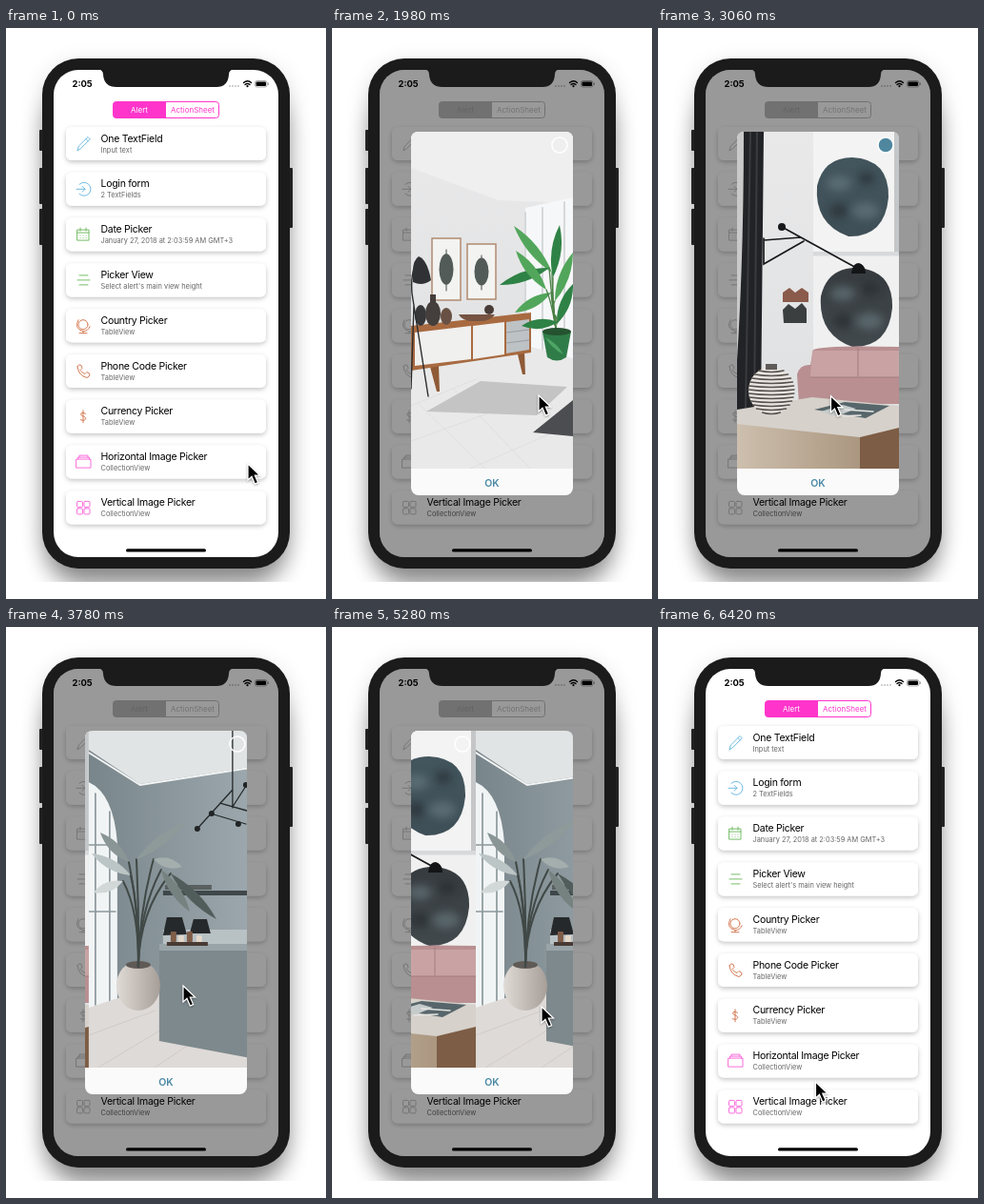
An HTML page for the animation above (7020 ms loop, 336x600 px).

```html
<!DOCTYPE html>
<html lang="en">
<head>
<meta charset="utf-8">
<title>Image picker</title>
<style>
html, body { margin: 0; width: 100%; height: 100%; overflow: hidden; background: #fff }
svg { display: block; font-family: Inter, "Liberation Sans", sans-serif }
.icon { fill: none; stroke: currentColor; stroke-width: .9; stroke-linecap: round; stroke-linejoin: round }
.tint { color: var(--tint) }
.on { fill: #fff }
.dimmed .tint { color: #bcbcbc }
.dimmed .on { fill: #a4a4a4 }
.title { font-size: 10.5px; letter-spacing: -.27px }
.note { font-size: 7.4px; fill: #666 }
</style>
</head>
<body>
<svg id="stage" width="336" height="600" viewBox="0 0 336 600"></svg>
<script>
const LOOP = 7020, STEP = 60, PAGE = 170;
const BLUE = '#5fb4dd', GREEN = '#67b657', ORANGE = '#d06c42', PINK = '#fb5fd8';

const rect = (x, y, w, h, fill, r = 0, more = '') =>
  `<rect x="${x}" y="${y}" width="${w}" height="${h}" rx="${r}" fill="${fill}" ${more}/>`;
const oval = (x, y, rx, ry, fill, more = '') =>
  `<ellipse cx="${x}" cy="${y}" rx="${rx}" ry="${ry}" fill="${fill}" ${more}/>`;
const shape = (d, fill) => `<path d="${d}" fill="${fill}"/>`;
const line = (d, stroke, w = 1) =>
  `<path d="${d}" fill="none" stroke="${stroke}" stroke-width="${w}" stroke-linecap="round"/>`;
const gradient = (id, a, b, across = 0) =>
  `<linearGradient id="${id}" x2="${across}" y2="${1 - across}"><stop stop-color="${a}"/><stop offset="1" stop-color="${b}"/></linearGradient>`;
const blur = (id, size) =>
  `<filter id="${id}" x="-30%" y="-20%" width="160%" height="140%"><feGaussianBlur stdDeviation="${size}"/></filter>`;

// A pointed leaf between two points, bulging by w on both sides.
function leaf(x1, y1, x2, y2, w, fill) {
  const len = Math.hypot(x2 - x1, y2 - y1);
  const nx = (y1 - y2) / len * w, ny = (x2 - x1) / len * w;
  const mx = (x1 + x2) / 2, my = (y1 + y2) / 2;
  return shape(`M${x1} ${y1}Q${mx + nx} ${my + ny} ${x2} ${y2}Q${mx - nx} ${my - ny} ${x1} ${y1}`, fill);
}

// ---- list behind the alert ----
const rows = [
  ['One TextField', 'Input text', BLUE, 'M-6 7l1.4-4.4L5-7l2.3 2.3L-2.3 5zM3-5l2.3 2.3'],
  ['Login form', '2 TextFields', BLUE, 'M-4-5A7 7 0 1 1-4 5M-7 0H2M-1-3L2 0-1 3'],
  ['Date Picker', 'January 27, 2018 at 2:03:59 AM GMT+3', GREEN,
    'M-6-5H6V6H-6zM-6-2H6M-3-7v3M3-7v3M-3 1h.1M0 1h.1M3 1h.1M-3 3.5h.1M0 3.5h.1M3 3.5h.1'],
  ['Picker View', "Select alert's main view height", GREEN, 'M-4-5H5M-6 0H7M-4 5H5'],
  ['Country Picker', 'TableView', ORANGE, 'M5-1A5 5 0 1 1-5-1A5 5 0 1 1 5-1M-5-6Q-10 3 0 6Q5 6 7 1M0 6v2M-4 8H4'],
  ['Phone Code Picker', 'TableView', ORANGE, 'M-6-5Q-4-8-2-6L-1-3L-3-1Q-1 2 2 3L4 1L7 3Q7 6 4 7Q-5 5-6-5'],
  ['Currency Picker', 'TableView', ORANGE, 'M2.5-3Q0-5-2-3.5C-4 0 3-1 2.7 2.5Q1 5-2.7 3.4M0-6.5V6.5'],
  ['Horizontal Image Picker', 'CollectionView', PINK, 'M-7-3H8V6H-7zM-5.5-3v-2H6.5v2M-4-5v-2H5v2'],
  ['Vertical Image Picker', 'CollectionView', PINK,
    [[-6.5, -6.5], [1, -6.5], [-6.5, 1], [1, 1]].map(([x, y]) => `M${x + 1} ${y}h4q1 0 1 1v4q0 1-1 1h-4q-1 0-1-1v-4q0-1 1-1`).join('')]
];
const cards = rows.map(([title, note, tint, icon], i) => `<g transform="translate(63 ${104 + i * 47.8})">
  ${rect(0, 0, 210, 35, '#fff', 6, 'filter="url(#cardShadow)"')}
  <path class="icon tint" style="--tint:${tint}" transform="translate(18 17.5)" d="${icon}"/>
  <text class="title" x="36.5" y="15.5">${title}</text><text class="note" x="36.5" y="26.5">${note}</text></g>`).join('');

const segments = `<g class="tint" style="--tint:#ff35cb" font-size="8" text-anchor="middle">
  ${rect(112.5, 77.5, 111, 17, 'none', 3, 'stroke="currentColor"')}
  ${shape('M168 77.5H115.5q-3 0-3 3v11q0 3 3 3H168z', 'currentColor')}
  <text class="on" x="140" y="89">Alert</text><text x="196" y="89" fill="currentColor">ActionSheet</text></g>`;

const status = `<text x="69.5" y="62" font-size="9.4" font-weight="700">2:05</text>
  ${[235, 238, 241, 244].map(x => oval(x, 61, .9, .9, '#bbb')).join('')}
  ${line('M249.5 57.5Q253.5 54 257.5 57.5M251 59.5Q253.5 57.5 256 59.5', '#000', 1.3)}${oval(253.5, 61.2, 1.1, 1.1, '#000')}
  ${rect(261.5, 55.5, 12.5, 6.5, 'none', 2, 'stroke="#888" stroke-width=".7"')}${rect(262.5, 56.5, 10.5, 4.5, '#000', 1)}${rect(274.7, 57.5, 1, 2.5, '#888')}`;

// ---- room pictures, each 170 x 354 ----
function tiles() {
  let d = '';
  const depth = r => 1 + r * .073, y = z => 134 + 220 / z;
  for (let r = 0; r < 26; r++) for (let c = -7; c < 7; c++) {
    if ((r + c) & 1) continue;
    const a = depth(r), b = depth(r + 1), x = (n, z) => 85 + n * 40 / z;
    d += `M${x(c, a)} ${y(a)}H${x(c + 1, a)}L${x(c + 1, b)} ${y(b)}H${x(c, b)}z`;
  }
  return shape(d, '#1d1e20');
}

const lounge = () => rect(0, 0, 86, 210, 'url(#wallGrey)') + rect(86, 0, 84, 210, 'url(#wallBlue)')
  + rect(0, 133, 170, 2, '#3b4a54')
  + `<path d="M36 196V90A50 51 0 0 1 136 90V196z" fill="url(#mirror)" stroke="#93a6b0"/>`
  + shape('M36 157Q50 150 63 164L66 190H36z', '#45312e') + shape('M72 168H100Q122 166 131 154Q135 170 108 174L94 176V192H86V174H72z', '#202226')
  + line('M82 166L76 145M83 165L84 142M84 165L91 147', '#25211f') + oval(76, 148, 5, 4, '#5e3a31') + oval(86, 148, 5, 4, '#784538')
  + rect(0, 196, 170, 14, '#34373b') + rect(0, 209, 170, 145, '#d9d6d3') + tiles()
  + line('M4 220L1 265M40 220L44 266M138 222L136 266M166 228L168 268', '#1b1b1c', 1.5)
  + shape('M0 154Q28 149 40 166Q51 182 47 214Q24 229 0 224z', '#7e4631') + shape('M0 192Q28 186 47 204Q44 225 0 224z', '#572f23')
  + shape('M170 155Q147 155 138 176L131 200Q131 218 140 227Q156 231 170 230z', '#573a34') + shape('M170 195Q148 191 135 206Q138 226 170 230z', '#3c2826')
  + shape('M54 241L60 269H64L65 245zM111 245L115 269H119L121 238zM81 246V272H85V246z', '#77777a')
  + shape('M48 231L66 221H109L122 231L116 242L89 247L56 243z', '#b4b4b2') + shape('M48 231L56 240L89 244L116 239L122 231L116 243L89 249L56 245z', '#858687')
  + shape('M64 228L74 207H81L84 228zM90 226L94 208H98L105 226Z', '#8e9796') + oval(77, 199, 6, 6, '#b49a8d') + oval(82, 190, 4, 4, '#d5cbc3');

const frame = (x, y, w, h) => rect(x, y, w, h, '#f3f3f1', 0, 'stroke="#b08b70" stroke-width="1.5"')
  + line(`M${x + w / 2} ${y + 12}v${h - 22}`, '#454b4a') + oval(x + w / 2, y + h / 2, w * .25, h * .25, '#535b59');

const palm = () => [[148, 148, 108, 99], [145, 143, 93, 161], [147, 169, 109, 190], [149, 153, 156, 98],
    [151, 178, 170, 127], [153, 202, 170, 160], [142, 166, 110, 125], [154, 200, 116, 204]]
  .map(([a, b, c, d], i) => line(`M153 214Q148 180 ${a} ${b}`, '#4c8047', 1.3) + leaf(a, b, c, d, 10, i & 1 ? '#2f8246' : '#52a65b')).join('');

const studio = () => rect(0, 0, 170, 354, 'url(#whiteWall)') + shape('M0 0H170V75L92 72L0 38z', '#efeff0')
  + shape('M120 80L170 69V245H120z', '#f6f7f8') + line('M120 85V234M138 80V236M161 74V225', '#d5d8da', 2)
  + frame(22, 112, 30, 65) + frame(59, 118, 30, 58)
  + shape('M0 252L126 226L170 238V354H0z', '#e9e9e9') + line('M0 288L68 260M0 325L125 280M62 354L170 307M45 270L125 354M8 286L78 354', '#d8d8d8', .6)
  + shape('M16 294L73 262L164 268L132 298z', '#c4c4c4') + shape('M128 316L170 282V320z', '#4c4d50')
  + shape('M20 247L27 273H30L29 245zM112 234L117 255H120L119 230z', '#8f5a36')
  + shape('M0 204L126 190V232L0 251z', '#a86a40') + shape('M4 211L63 204V239L4 246zM65 204L98 200V234L65 239z', '#f0f0ef') + shape('M100 200L124 197V229L100 233z', '#bdc2c5') + line('M100 211L124 208M100 222L124 219', '#8a8f92', .7)
  + oval(10, 193, 6, 11, '#37373a') + oval(23, 191, 8, 13, '#443e3c') + rect(20, 171, 6, 9, '#443e3c') + oval(37, 194, 6, 9, '#685144')
  + shape('M50 192H88Q83 200 69 199Q54 200 50 192z', '#765342') + oval(82, 187, 5, 5, '#493c37')
  + line('M8 137Q-1 144 1 170L18 278M3 182L0 270', '#2b2c2e', 1.4) + shape('M2 158Q0 136 8 131Q17 134 21 156Q12 163 2 158z', '#303134')
  + palm() + shape('M138 210H168L163 237Q153 244 143 237z', '#2f7c49') + oval(153, 210, 15, 4, '#25522f') + leaf(141, 216, 160, 234, 4, '#4ea565');

const blob = (x, y, fill) => shape(`M${x - 37} ${y - 12}Q${x - 30} ${y - 42} ${x} ${y - 42}Q${x + 39} ${y - 40} ${x + 38} ${y}Q${x + 34} ${y + 42} ${x - 4} ${y + 41}Q${x - 40} ${y + 28} ${x - 37} ${y - 12}`, fill)
  + `<g filter="url(#soft)" opacity=".55">${oval(x - 14, y - 15, 13, 8, '#6d8087')}${oval(x + 14, y + 14, 14, 9, '#6d8087')}${oval(x + 15, y - 20, 9, 7, '#20262a')}${oval(x - 14, y + 14, 10, 8, '#20262a')}</g>`;

function stripes() {
  let s = oval(36, 272, 24, 25, '#e8e4df') + rect(30, 244, 12, 6, '#5f5b58');
  for (let y = -21; y < 24; y += 4) {
    const w = 24 * Math.sqrt(1 - y * y / 625);
    s += line(`M${36 - w} ${272 + y}Q36 ${275 + y} ${36 + w} ${272 + y}`, '#56514e', 1.5);
  }
  return s;
}

const gallery = () => rect(0, 0, 170, 354, 'url(#whiteWall)') + rect(80, 0, 85, 126, '#f3f3f3') + rect(80, 131, 90, 110, '#f0f0f0') + rect(80, 126, 90, 4, '#d8d9da') + rect(165, 0, 5, 126, '#c4c6c8')
  + blob(121, 69, 'url(#paintBlue)') + blob(125, 185, 'url(#paintGrey)')
  + rect(0, 0, 9, 293, '#c9c9ca') + shape('M7 0H28L25 293H0V240Q7 130 7 0z', '#222326') + line('M14 0L9 290M21 0L18 290', '#3a3b3e', 2)
  + line('M28 112V139L70 115M28 114L67 111M47 100L127 144', '#18191b', 1.7) + oval(47, 100, 4, 4, '#18191b') + shape('M120 149Q121 138 128 138Q135 140 135 149z', '#141517')
  + shape('M48 169L55 164L61 169L68 164L75 169V179H48z', '#8a5a4b') + shape('M48 187L54 181L61 186L68 180L73 186V201H49z', '#3c3f40')
  + shape('M63 255Q66 244 77 245L80 229Q91 224 170 226V286H65z', '#b98f91') + shape('M79 230H170V258H77z', '#c9a3a4') + line('M77 258H170M127 228V257', '#a37c80')
  + shape('M0 292L79 279L170 288V311L129 321L0 307z', '#d6d1cb') + shape('M0 307L129 321V354H0z', 'url(#wood)') + shape('M129 321L170 311V354H129z', '#7d5d45')
  + shape('M81 292L113 284L160 288L135 301z', '#57666b') + shape('M88 294L111 287L125 291L105 299z', '#c5cbcb') + line('M113 292L143 294M105 299L130 298', '#e5e5e2', 1.5) + stripes();

const fronds = () => [[44, 152, 3, 129, '#bcc5c5'], [42, 138, 12, 107, '#8a9595'], [36, 158, 5, 170, '#d2d8d8'], [50, 135, 103, 95, '#8e9a9a'],
    [68, 135, 98, 143, '#a4aead'], [86, 150, 134, 198, '#515d5b'], [76, 146, 106, 190, '#76827f']]
  .map(([a, b, c, d, fill]) => line(`M52 248Q53 190 ${a} ${b}`, '#414947', 2) + leaf(a, b, c, d, 10, fill)).join('');

const kitchen = () => rect(0, 0, 170, 354, 'url(#slate)') + shape('M0 0H170V38L54 56L0 20z', '#e1e4e5') + line('M0 23L54 57L170 39', '#f3f4f4', 2)
  + shape('M0 54Q26 66 30 118V282L0 292z', '#f1f4f5') + line('M7 66V288M0 120H28M22 85V285M0 190H28', '#8c989c', 1.7)
  + shape('M0 291L64 270L170 300V354H0z', '#dedad7') + line('M0 320L70 294M10 354L83 310M69 354L105 330', '#cbc5c0', .7)
  + rect(78, 168, 92, 5, '#3f474a') + rect(80, 162, 49, 5, '#59605f') + rect(78, 209, 92, 15, '#b8c1c4') + shape('M78 215L82 196H98L103 214zM106 213L110 198H124L128 213z', '#26292b')
  + shape('M74 224H170V344L74 326z', '#7d898d') + shape('M74 224H170V231H74z', '#98a4a8') + rect(82, 222, 43, 4, '#493b34')
  + [86, 94, 103, 113].map((x, i) => rect(x, 211 + i % 2 * 4, 6, 11 - i % 2 * 4, i & 1 ? '#e2d7c9' : '#805d48', 1)).join('')
  + oval(52, 268, 23, 26, 'url(#clay)') + oval(52, 246, 13, 4, '#5f5a55') + fronds()
  + line('M151 0V81M151 62L113 104M128 87L165 98M151 80L167 55M138 76L166 84', '#25292b', 1.3)
  + [[114, 103], [129, 87], [157, 98], [165, 57]].map(([x, y]) => oval(x, y, 3, 3, '#202425')).join('');

const pictures = [lounge, studio, gallery, kitchen].map((draw, i) =>
  `<svg x="${i * PAGE}" width="${PAGE}" height="354">${draw()}<circle class="check" cx="156" cy="14" r="8" fill="none" stroke="#fff" stroke-width="1.5"/></svg>`).join('');

stage.innerHTML = `<defs>
  ${gradient('wallGrey', '#5b575c', '#4f4e54')}${gradient('wallBlue', '#4d5f6c', '#4f7488', 1)}${gradient('mirror', '#48484c', '#343539')}
  ${gradient('whiteWall', '#e9e9ea', '#dedfe0')}${gradient('paintBlue', '#43555d', '#3f4f57')}${gradient('paintGrey', '#363b3f', '#42494d')}
  ${gradient('slate', '#78858a', '#9ca8ad', 1)}${gradient('wood', '#cdbfae', '#ab9780', 1)}${gradient('clay', '#e0dbd6', '#a79e98', 1)}
  <filter id="cardShadow" x="-10%" y="-30%" width="120%" height="180%"><feDropShadow dx="0" dy="2" stdDeviation="2.5" flood-opacity=".23"/></filter>
  <filter id="cursorShadow" x="-40%" y="-20%" width="200%" height="160%"><feDropShadow dx="0" dy="1" stdDeviation="1" flood-opacity=".4"/></filter>
  ${blur('glow', 12)}${blur('soft', 4)}
  <clipPath id="sheet">${rect(14, 0, 308, 582)}</clipPath>
  <clipPath id="photos"><path d="M83 463V117q0-8 8-8H245q8 0 8 8V463z"/></clipPath></defs>
  <g clip-path="url(#sheet)">${rect(38, 38, 260, 530, '#000', 40, 'opacity=".14" filter="url(#glow)"')}${rect(42, 66, 252, 520, '#000', 40, 'opacity=".42" filter="url(#glow)"')}</g>
  ${rect(35, 107, 5, 22, '#222', 1)}${rect(35, 147, 5, 38, '#222', 1)}${rect(35, 190, 5, 38, '#222', 1)}${rect(296, 147, 5, 63, '#222', 1)}
  ${rect(38, 32, 260, 536, '#1b1b1c', 38)}
  ${rect(50, 44, 236, 512, '#fff', 26)}
  <g id="list">${segments}${cards}</g>${status}
  ${rect(50, 44, 236, 512, '#000', 26, 'id="shade"')}
  ${rect(126, 547.3, 84, 3.2, '#000', 1.6)}
  ${shape('M97 43.5Q102 44 102 49Q103 62 116 62H221Q233 62 234 49Q234 44 239 43.5z', '#1b1b1c')}
  <g id="alert">${rect(83, 109, 170, 382, '#fafafa', 8)}
    <g clip-path="url(#photos)"><g id="strip">${pictures}</g></g>
    <text x="168" y="481.5" font-size="10.5" font-weight="600" fill="#4787a3" text-anchor="middle">OK</text></g>
  <path id="cursor" d="M0 0V17L4 13.3L7.3 21L10.6 19.6L7.3 12H12.5z" stroke="#fff" stroke-width="1.2" filter="url(#cursorShadow)"/>`;

// ---- motion ----
const smooth = p => p * p * (3 - 2 * p);
const flick = p => smooth(1 - (1 - p) ** 2);
const speedUp = p => p * p;
const slowDown = p => 1 - (1 - p) ** 2;

const pageKeys = [[1380, 0], [1980, 1, flick], [2200, 1], [2820, 2, flick], [3360, 2], [3960, 3, flick],
  [4920, 3], [5280, 2.6, speedUp], [5580, 2, slowDown]];
const cursorKeys = [[1020, 254, 458], [1260, 201, 385], [1400, 201, 385], [1620, 125, 388], [1740, 125, 388], [1980, 217, 386],
  [2190, 217, 386], [2460, 153, 388], [2880, 153, 388], [3180, 197, 386], [3330, 197, 386], [3540, 122, 380], [3780, 186, 377],
  [4620, 186, 377], [4800, 143, 390], [4920, 143, 390], [5280, 220, 399], [5400, 222, 406], [5640, 165.5, 478]];
const fadeKeys = [[0, 0], [720, .5], [900, 1], [6000, .7], [6120, .35], [6300, .1], [6420, 0]];

function at(keys, t) {
  const i = keys.findIndex(k => k[0] > t);
  if (i < 1) return (i ? keys[keys.length - 1] : keys[0]).slice(1, 3);
  const a = keys[i - 1], b = keys[i], last = b[b.length - 1];
  const ease = typeof last == 'function' ? last : smooth;
  const p = ease((t - a[0]) / (b[0] - a[0]));
  return [1, 2].map(n => a[n] + (b[n] - a[n]) * p);
}

const $ = id => document.getElementById(id);
const checks = document.querySelectorAll('.check');

function draw(now) {
  const t = Math.floor(now % LOOP / STEP) * STEP;
  const fade = fadeKeys.filter(k => k[0] <= t).pop()[1];
  const chosen = t < 2940 ? -1 : t < 4500 ? 2 : 3;
  $('shade').setAttribute('opacity', fade * .4);
  $('alert').setAttribute('opacity', fade);
  $('list').setAttribute('class', fade > .2 ? 'dimmed' : '');
  $('strip').setAttribute('transform', `translate(${83 - PAGE * at(pageKeys, t)[0]} 109)`);
  $('cursor').setAttribute('transform', `translate(${at(cursorKeys, t)})`);
  checks.forEach((c, i) => c.setAttribute('fill', i == chosen ? '#4f879f' : 'none'));
  requestAnimationFrame(draw);
}
draw(performance.now());
</script>
</body>
</html>
```
